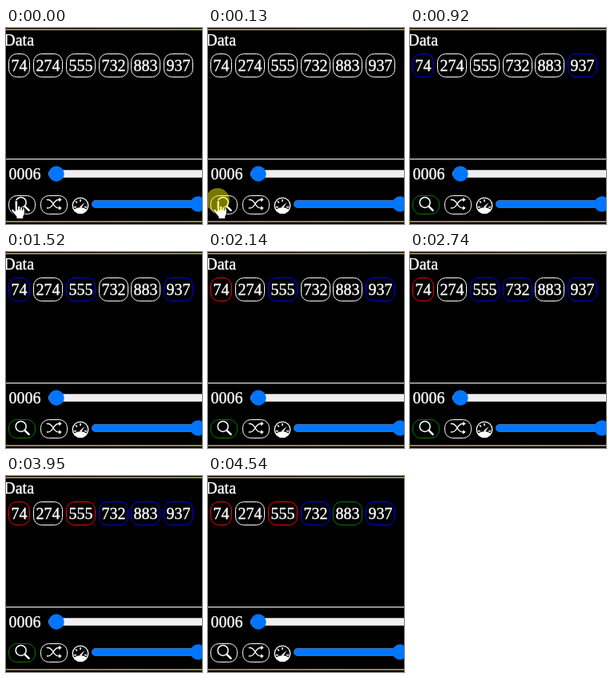
An HTML page with a canvas that plays this animation: 245 by 246 pixels, repeating every 5000 ms.

```html
<!DOCTYPE html>
<html lang="en">
<head>
<meta charset="utf-8">
<title>Binary search</title>
<style>
html, body { margin: 0; width: 100%; height: 100%; overflow: hidden; background: #000; }
canvas { display: block; width: 245px; height: 246px; }
</style>
</head>
<body>
<canvas id="stage" width="245" height="246"></canvas>
<script>
const ctx = document.getElementById('stage').getContext('2d');
const LOOP = 5000;
const ACCENT = '#0075ff';

// value, left edge, width, then [time, colour] border changes
const chips = [
  ['74', 3, 27, [330, 'blue'], [2140, 'red']],
  ['274', 34, 37],
  ['555', 75, 37, [1520, 'blue'], [3350, 'red']],
  ['732', 116, 37, [2740, 'blue']],
  ['883', 156, 37, [3950, 'blue'], [4540, 'green']],
  ['937', 197, 37, [920, 'blue']]
];
const searchSteps = [[330, 'green'], [4540, 'white']];

const shuffleLines = new Path2D(
  'M.5 3.5H1C4 3.5 5.9 6 7 8S10 12.5 13 12.5M.5 12.5H1C4 12.5 5.9 10 7 8S10 3.5 13 3.5');
const shuffleTips = new Path2D('M13 1.2L16 3.5L13 5.8ZM13 10.2L16 12.5L13 14.8Z');
const lens = new Path2D('M12 6.5A5.5 5.5 0 1 1 1 6.5A5.5 5.5 0 1 1 12 6.5Z');
const handle = new Path2D('M10.8 10.8L14.9 14.9');
const dial = new Path2D('M2 11.6A7 7 0 1 1 14 11.6A12 12 0 0 0 2 11.6Z');
const ticks = new Path2D('M8 2.5V4M3.7 4.2L4.6 5.1M2.2 9.5H3.7M12.3 9.5H13.8');
const needle = new Path2D('M7.2 9.5L12.2 4.9L8.8 10.5Z');
const hand = new Path2D(
  'M5 2.5Q5 .6 6.8 .6T8.6 2.5V7.5Q11.3 6.8 11.8 8.6Q14 8 14.5 9.8' +
  'Q17.4 9.4 17.4 12V16Q17.2 18.5 15.8 20.2V23.4H7V20.8L1.2 14' +
  'Q.2 12.2 1.6 11.5T4.2 12.8L5 13.7Z');
const knuckles = new Path2D('M8.6 7.5V12M11.8 8.6V12M14.5 9.8V12.4');

const gold = ctx.createLinearGradient(0, 0, 245, 0);
gold.addColorStop(0, '#8f8350');
gold.addColorStop(1, '#8a885a');

function colourAt(steps, t) {
  let colour = 'white';
  for (const [start, next] of steps) if (t >= start) colour = next;
  return colour;
}

function bar(x, y, w, h, colour) {
  ctx.fillStyle = colour;
  ctx.fillRect(x, y, w, h);
}

function disc(x, y, r, colour) {
  ctx.fillStyle = colour;
  ctx.beginPath();
  ctx.arc(x, y, r, 0, Math.PI * 2);
  ctx.fill();
}

function outline(x, y, w, h, r, colour) {
  ctx.strokeStyle = colour;
  ctx.lineWidth = 1;
  ctx.beginPath();
  ctx.roundRect(x + .5, y + .5, w - 1, h - 1, r - .5);
  ctx.stroke();
}

function label(text, x, y) {
  ctx.fillStyle = ctx.strokeStyle = 'white';
  ctx.lineWidth = .35;
  ctx.font = '20px "Liberation Serif", "Times New Roman", serif';
  ctx.fillText(text, x, y);
  ctx.strokeText(text, x, y);
}

function at(x, y, scale, draw) {
  ctx.save();
  ctx.translate(x, y);
  ctx.scale(scale, scale);
  ctx.fillStyle = ctx.strokeStyle = 'white';
  ctx.lineWidth = 1;
  ctx.lineCap = 'round';
  draw();
  ctx.restore();
}

function slider(x, y, thumb, colour) {
  ctx.fillStyle = colour;
  ctx.beginPath();
  ctx.roundRect(x, y - 5, 200, 10, 5);
  ctx.fill();
  outline(x, y - 5, 200, 10, 5, 'rgba(118, 118, 118, .5)');
  disc(thumb, y, 9.7, ACCENT);
}

function drawIcons() {
  at(11, 211.3, 1.18, () => {
    ctx.lineWidth = 1.3;
    ctx.stroke(lens);
    ctx.lineWidth = 2.1;
    ctx.stroke(handle);
  });
  at(50.8, 211.3, 1.18, () => {
    ctx.lineWidth = 1.2;
    ctx.stroke(shuffleLines);
    ctx.fill(shuffleTips);
  });
  at(82.6, 212.4, 1.3, () => {
    disc(8, 8, 8, 'white');
    ctx.fillStyle = 'black';
    ctx.fill(dial);
    ctx.lineWidth = 1.2;
    ctx.stroke(ticks);
    ctx.fillStyle = 'white';
    ctx.fill(needle);
  });
}

function drawPointer(t) {
  if (t >= 660) return;
  at(6, t < 590 ? 216 : 228, 1, () => {
    ctx.fill(hand);
    ctx.strokeStyle = 'black';
    ctx.stroke(hand);
    ctx.stroke(knuckles);
  });
  if (t >= 130 && t < 330) disc(12, 216, 15, 'rgba(255, 255, 0, .47)');
}

function draw(t) {
  bar(0, 0, 245, 246, 'black');
  bar(0, 1, 245, 2, gold);
  bar(0, 242, 245, 2, gold);
  bar(0, 164, 245, 1, 'white');

  label('Data', -2.7, 21.5);
  for (const [value, x, w, ...steps] of chips) {
    outline(x, 32, w, 30, 10.5, colourAt(steps, t));
    label(value, x + 3.5, 54);
  }

  label('0006', 3.5, 190);
  slider(53, 183, 63, '#efefef');
  slider(107, 221, 240, ACCENT);
  outline(3, 210, 34, 24, 10.5, colourAt(searchSteps, t));
  outline(43, 210, 34, 24, 10.5, 'white');
  drawIcons();
  drawPointer(t);
}

const begin = performance.now();
function tick() {
  draw((performance.now() - begin) % LOOP);
  requestAnimationFrame(tick);
}
tick();
</script>
</body>
</html>
```
